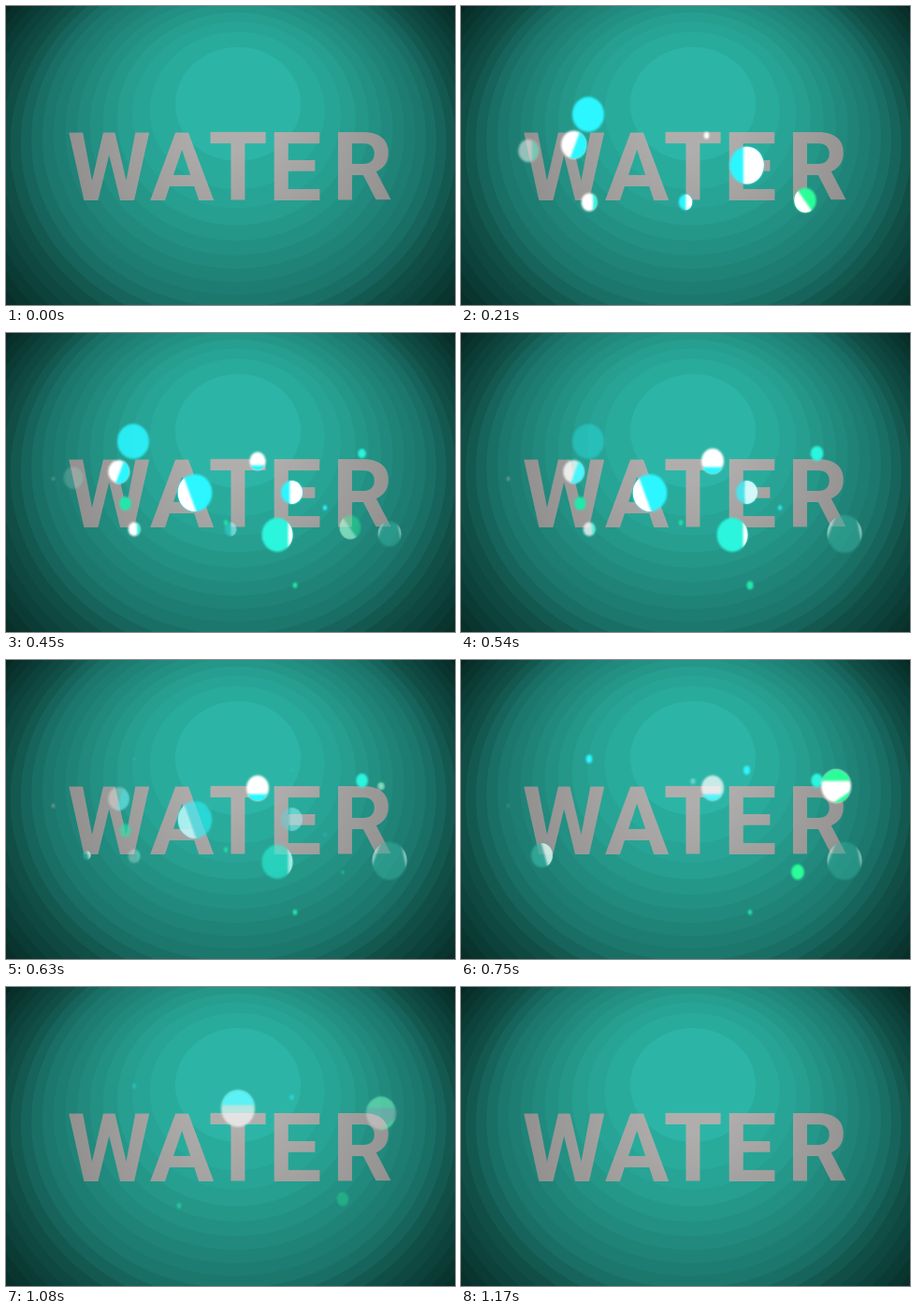
Recreate the animation shown at these times as an HTML page with a canvas. Size 480 by 320 pixels, loop 1.2 s.

```html
<!DOCTYPE html>
<html lang="en">
<head>
<meta charset="utf-8">
<title>Water</title>
<style>
html, body { margin: 0; width: 100%; height: 100%; overflow: hidden; background: #010c0a; }
canvas { display: block; width: 480px; height: 320px; }
</style>
</head>
<body>
<canvas id="stage" width="480" height="320" role="img" aria-label="WATER"></canvas>
<script>
const LOOP = 1200, STEP = 30;
const WHITE = '#ffffff', CYAN = '#2cf6ff', AQUA = '#2bf5dc', GREEN = '#2bfd98', MINT = '#24e6aa';
const stage = document.getElementById('stage');
const ctx = stage.getContext('2d');

const lerp = (a, b, u) => a + (b - a) * u;
const ramp = (v, from, to) => Math.min(1, Math.max(0, (v - from) / (to - from)));
const smooth = u => u * u * (3 - 2 * u);

// Each side is [colour, direction in degrees, distance from the centre in radii].
const drops = [];
function wave(born, life, items) {
  for (const item of items) drops.push({ born, life, end: 1, alpha: 1, sides: [], ...item });
}

wave(45, 600, [
  { x: 136, y: 116, r: 17, fill: CYAN, life: 550 },
  { x: 120.5, y: 148.5, r: 13.5, end: .83, fill: WHITE, sides: [[CYAN, 20, .1]], life: 650 },
  { x: 72, y: 155, r: 11, end: .95, fill: '#e2eae8', sides: [['#45c8a4', 0, .35]], alpha: .6, life: 450 },
  { x: 137, y: 210, r: 8.5, end: .75, fill: WHITE, sides: [[AQUA, 0, .5]], life: 640 },
  { x: 240, y: 210, r: 8, end: .8, fill: CYAN, sides: [[WHITE, 0, .05]], life: 450 },
  { x: 305.5, y: 170.5, r: 18.5, end: .62, fill: CYAN, sides: [[WHITE, 0, -.2]], life: 640 },
  { x: 262.5, y: 138.5, r: 3.5, end: .6, fill: WHITE, life: 430 },
  { x: 368, y: 208, r: 12, end: .95, fill: GREEN, sides: [[WHITE, 145, .05]], life: 460 }
]);

wave(210, 510, [
  { x: 202, y: 171, r: 19, end: .96, fill: CYAN, sides: [[WHITE, 160, .3]] },
  { x: 127.5, y: 182.5, r: 8, end: .78, fill: MINT },
  { x: 290, y: 216, r: 16.5, fill: AQUA, sides: [[WHITE, 0, .7]] },
  { x: 341, y: 187, r: 3.5, end: .6, fill: CYAN, life: 440 }
]);

wave(375, 550, [
  { x: 269, y: 137, r: 12, fill: WHITE, sides: [[CYAN, 90, .55]], life: 480 },
  { x: 380.5, y: 129, r: 7, end: .9, fill: AQUA },
  { x: 410, y: 215, r: 18.5, fill: '#38b3a2', alpha: .5,
    sides: [[WHITE, 200, .85], [WHITE, -12, .87]], life: 510 },
  { x: 309, y: 270, r: 3.8, end: .55, fill: MINT },
  { x: 50.5, y: 156, r: 1.5, fill: '#d2c4c2', alpha: .5, life: 430 },
  { x: 235, y: 203, r: 2, fill: MINT, life: 340 }
]);

wave(600, 530, [
  { x: 401, y: 135, r: 16, fill: WHITE, sides: [[GREEN, -90, .35], [GREEN, 55, .82]] },
  { x: 360, y: 227, r: 7, end: .9, fill: GREEN },
  { x: 137, y: 106, r: 3.5, end: .6, fill: CYAN },
  { x: 305.5, y: 118, r: 3.6, end: .6, fill: CYAN, life: 565 },
  { x: 86.5, y: 209, r: 11.5, fill: '#38b3a2', sides: [[WHITE, -15, .25]], alpha: .7, life: 340 }
]);

wave(735, 430, [
  { x: 248, y: 130, r: 18, fill: WHITE, sides: [[CYAN, -90, .2]] },
  { x: 185, y: 234, r: 2, fill: MINT }
]);

const shades = [
  [0, 44, 181, 166], [.25, 37, 155, 141], [.54, 27, 115, 105],
  [.67, 16, 79, 71], [.86, 8, 47, 42], [1, 2, 20, 18]
];

function shade(u) {
  const i = Math.max(1, shades.findIndex(s => s[0] >= u));
  const a = shades[i - 1], b = shades[i], k = ramp(u, a[0], b[0]);
  return `rgb(${[1, 2, 3].map(c => Math.round(lerp(a[c], b[c], k)))})`;
}

function ellipse(c, x, y, rx, ry) {
  c.beginPath();
  c.ellipse(x, y, rx, ry, 0, 0, Math.PI * 2);
}

function drawBackground(c) {
  const bands = 22;
  c.fillStyle = shade(1);
  c.fillRect(0, 0, 480, 320);
  for (let k = bands; k >= 0; k--) {
    const u = (k / bands) ** .75;
    ellipse(c, 248 - 8 * u, 105 + 70 * u, 67 + 270 * u, 61 + 236 * u);
    c.fillStyle = shade(u);
    c.fill();
  }
}

function drawTitle(c) {
  const ink = c.createRadialGradient(248, 105, 50, 248, 130, 200);
  ink.addColorStop(0, '#b0aeac');
  ink.addColorStop(1, '#8e8d8c');
  c.fillStyle = ink;
  c.font = 'bold 102px Roboto, Arial, sans-serif';
  c.textAlign = 'center';
  const centres = [110, 188, 248, 309, 381];
  [...'WATER'].forEach((letter, i) => c.fillText(letter, centres[i], 208));
}

function makeScene() {
  const scene = document.createElement('canvas');
  scene.width = 480;
  scene.height = 320;
  const c = scene.getContext('2d');
  drawBackground(c);
  drawTitle(c);
  return scene;
}

function drawDrop(d, time) {
  const p = (time - d.born) / d.life;
  if (p <= 0 || p >= 1) return;
  const size = lerp(.1, 1, smooth(ramp(p, 0, .25))) * lerp(1, d.end, ramp(p, .25, .5));
  ctx.save();
  ctx.globalAlpha = d.alpha * ramp(p, 0, .1) * (1 - ramp(p, .7, 1));
  ctx.filter = 'blur(1px)';
  ctx.translate(d.x, d.y);
  ctx.scale(size, size);
  const ry = d.r * 1.04 + 1;
  ellipse(ctx, 0, 0, d.r, ry);
  ctx.fillStyle = d.fill;
  ctx.fill();
  ctx.clip();
  for (const [colour, angle, offset] of d.sides) {
    ctx.save();
    ctx.rotate(angle * Math.PI / 180);
    ctx.fillStyle = colour;
    ctx.fillRect(offset * d.r, -2 * ry, 3 * ry, 4 * ry);
    ctx.restore();
  }
  ctx.restore();
}

const scene = makeScene();
const start = performance.now();

function draw(now) {
  const elapsed = Math.max(0, now - start) % LOOP;
  const time = Math.floor(elapsed / STEP) * STEP;
  ctx.drawImage(scene, 0, 0);
  if (time >= 60) for (const d of drops) drawDrop(d, time);
  requestAnimationFrame(draw);
}
draw(start);
</script>
</body>
</html>
```
